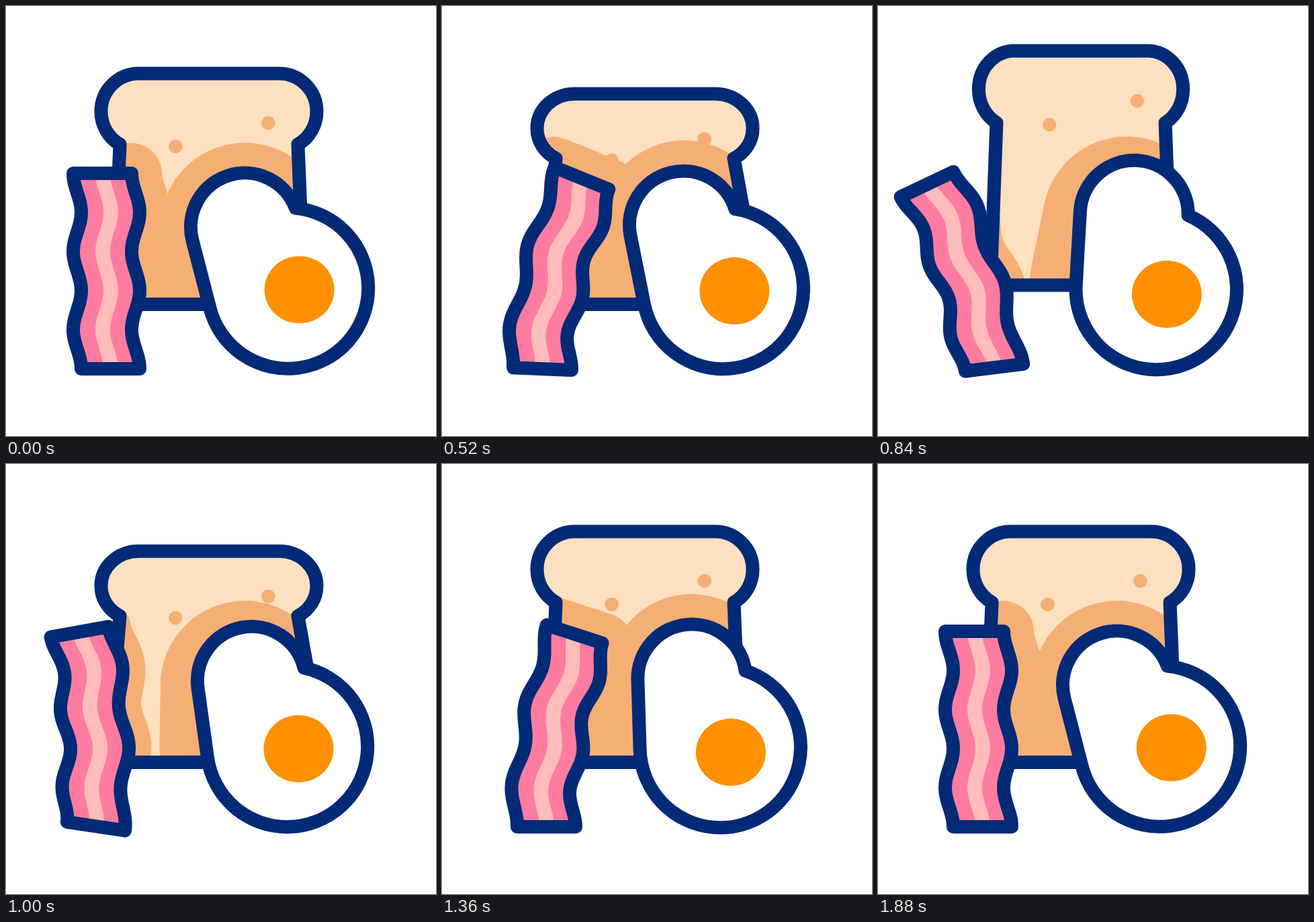
Recreate the animation shown at these times as an HTML page. Size 640 px wide and 640 px high, loop 1.92 s.

```html
<!DOCTYPE html>
<html lang="en">
<head>
<meta charset="utf-8">
<title>Breakfast</title>
<style>
  html, body { margin: 0; width: 100%; height: 100%; overflow: hidden; background: #fff; }
  svg { display: block; width: 100%; height: 100%; }
  .line { fill: none; stroke: #032a76; stroke-width: 20; stroke-linejoin: round; }
  .shade { fill: #f5af75; }
</style>
</head>
<body>
<svg viewBox="0 0 640 640">
  <clipPath id="crust"><path id="crustClip"/></clipPath>
  <path id="bread" fill="#fce0bf"/>
  <g clip-path="url(#crust)" class="shade">
    <path id="baconShade" stroke="#f5af75" stroke-linejoin="round"/>
    <path id="eggShade"/>
    <circle id="crumbA" r="10.3"/>
    <circle id="crumbB" r="10.3"/>
  </g>
  <path id="breadLine" class="line"/>
  <path id="bacon" fill="#ff7ca1"/>
  <path id="stripe" fill="#ffbcb8"/>
  <path id="baconLine" class="line"/>
  <path id="egg" class="line" style="fill:#fff"/>
  <ellipse id="yolk" rx="52" ry="50" fill="#ff9100"/>
</svg>
<script>
const LOOP = 1920, STEP = 40, RAD = Math.PI / 180, TAU = Math.PI * 2;
const el = id => document.getElementById(id);
const set = (id, attrs) => { for (const k in attrs) el(id).setAttribute(k, attrs[k]); };
const fix = n => n.toFixed(2);

function ease(t, from, to) {
  const p = Math.min(1, Math.max(0, (t - from) / (to - from)));
  return p * p * (3 - 2 * p);
}

// Rises smoothly from 0 to 1 at the peak, then falls back to 0.
const swing = (t, from, peak, to) => ease(t, from, peak) - ease(t, peak, to);

// Height of the bread's jump, a plain parabola.
const jump = t => 35 * Math.max(0, 1 - ((t - 780) / 140) ** 2);

function poseAt(t) {
  const rebound = 14 * swing(t, 1100, 1450, 1800);
  return {
    hop: jump(t),
    height: 1 - .091 * swing(t, 200, 560, 640) + .028 * swing(t, 640, 770, 920)
      - .088 * swing(t, 920, 1010, 1240),
    width: 1 - .06 * swing(t, 600, 800, 980),
    baconBase: 11 * swing(t, 40, 380, 580) - 9.4 * swing(t, 580, 780, 960)
      + 11.5 * swing(t, 840, 1080, 1360),
    baconTip: 22.5 * swing(t, 80, 560, 760) - 25.5 * swing(t, 620, 830, 1130)
      + 19.3 * swing(t, 1000, 1300, 1680),
    baconGlow: 45 - 16 * swing(t, 560, 840, 1300),
    eggBody: 20 * swing(t, 410, 780, 1080) + 18.8 * swing(t, 1080, 1400, 1800),
    eggLobe: 19 * swing(t, 420, 820, 1130) + rebound,
    eggGlow: 12 * swing(t, 360, 800, 1000) + rebound
  };
}

function drawBread({ hop, height, width }) {
  const X = x => 302 + (x - 302) * width;
  const Y = y => 444 - hop - (444 - y) * height;
  const at = (x, y) => fix(X(x)) + ' ' + fix(Y(y));
  const press = Math.max(0, 1 - height);
  const arc = `A${fix(56 * width)} ${fix(56.3 * height)} 0 0 1 `;
  const d = `M${at(197.5, 100.5)}L${at(406.5, 100.5)}${arc}${at(462.5, 156.8)}${arc}${at(434.5, 206)}`
    + `L${at(444 + 345 * press, 444)}L${at(160 - 100 * press, 444)}L${at(169.5, 206)}`
    + `${arc}${at(141.5, 156.8)}${arc}${at(197.5, 100.5)}Z`;
  for (const id of ['bread', 'crustClip', 'breadLine']) set(id, { d });
  set('crumbA', { cx: X(252.5), cy: Y(209) });
  set('crumbB', { cx: X(390.5), cy: Y(174) });
}

// A wavy strip standing on its base, bending from base angle to tip angle,
// most strongly near the base.
function spine(base, tip) {
  const n = 60, len = 291, rows = [];
  const angle = s => base + (tip - base) * s ** .7;
  let x = 149.5 - 145 * Math.sin(base), y = 395 + 145 * Math.cos(base);
  for (let i = 0; i <= n; i++) {
    rows.push({ x, y, a: angle(i / n), wave: 6 * Math.cos(5 * Math.PI * i / n) });
    const mid = angle((i + .5) / n);
    x += Math.sin(mid) * len / n;
    y -= Math.cos(mid) * len / n;
  }
  return rows;
}

function strip(rows, left, right) {
  const side = off => rows.map(r => {
    const u = r.wave + off;
    return fix(r.x + u * Math.cos(r.a)) + ' ' + fix(r.y + u * Math.sin(r.a));
  });
  return 'M' + [...side(left), ...side(right).reverse()].join('L') + 'Z';
}

function drawBacon({ baconBase, baconTip, baconGlow }) {
  const rows = spine(baconBase * RAD, baconTip * RAD);
  const d = strip(rows, -43.5, 43.5);
  set('bacon', { d });
  set('baconLine', { d });
  set('stripe', { d: strip(rows, -10.5, 11.5) });
  set('baconShade', { d, 'stroke-width': baconGlow * 2 });
}

// Turn a point around the egg's pivot, optionally pulling it outwards.
function turn(x, y, deg, pull = 1) {
  const c = pull * Math.cos(deg * RAD), s = pull * Math.sin(deg * RAD);
  const dx = x - 412, dy = y - 404;
  return [412 + dx * c - dy * s, 404 + dx * s + dy * c];
}

// Two circles joined by a tangent on the left, meeting in a notch on the right.
function eggPath(a, r, b, R) {
  const dx = b[0] - a[0], dy = b[1] - a[1], D = Math.hypot(dx, dy), dir = Math.atan2(dy, dx);
  const edge = dir + Math.asin((R - r) / D) + Math.PI / 2;
  const notch = dir - Math.acos((r * r + D * D - R * R) / (2 * r * D));
  const on = (c, rad, ang) => [c[0] + rad * Math.cos(ang), c[1] + rad * Math.sin(ang)];
  const n = on(a, r, notch), back = Math.atan2(n[1] - b[1], n[0] - b[0]);
  const big = (from, to) => ((to - from) % TAU + TAU) % TAU > Math.PI ? 1 : 0;
  const p = pt => pt.map(fix).join(' ');
  return `M${p(on(a, r, edge))}A${r} ${r} 0 ${big(edge, notch)} 1 ${p(n)}`
    + `A${R} ${R} 0 ${big(back, edge)} 1 ${p(on(b, R, edge))}Z`;
}

function drawEgg({ eggLobe, eggBody, eggGlow, hop }) {
  const lobe = (deg, pull) => turn(355.5, 329, deg, pull);
  const body = deg => turn(419.5, 420, deg);
  set('egg', { d: eggPath(lobe(eggLobe, 1 + hop * .0017), 80.5, body(eggBody), 119.7) });
  set('eggShade', { d: eggPath(lobe(eggGlow), 125.5, body(eggGlow), 191) });
  const [cx, cy] = turn(436.7, 422.3, eggBody);
  set('yolk', { cx, cy });
}

function draw(t) {
  const pose = poseAt(t);
  drawBread(pose);
  drawBacon(pose);
  drawEgg(pose);
}

const start = performance.now();
function tick() {
  const t = (performance.now() - start) % LOOP;
  draw(Math.floor(t / STEP) * STEP);
  requestAnimationFrame(tick);
}
tick();
</script>
</body>
</html>
```
